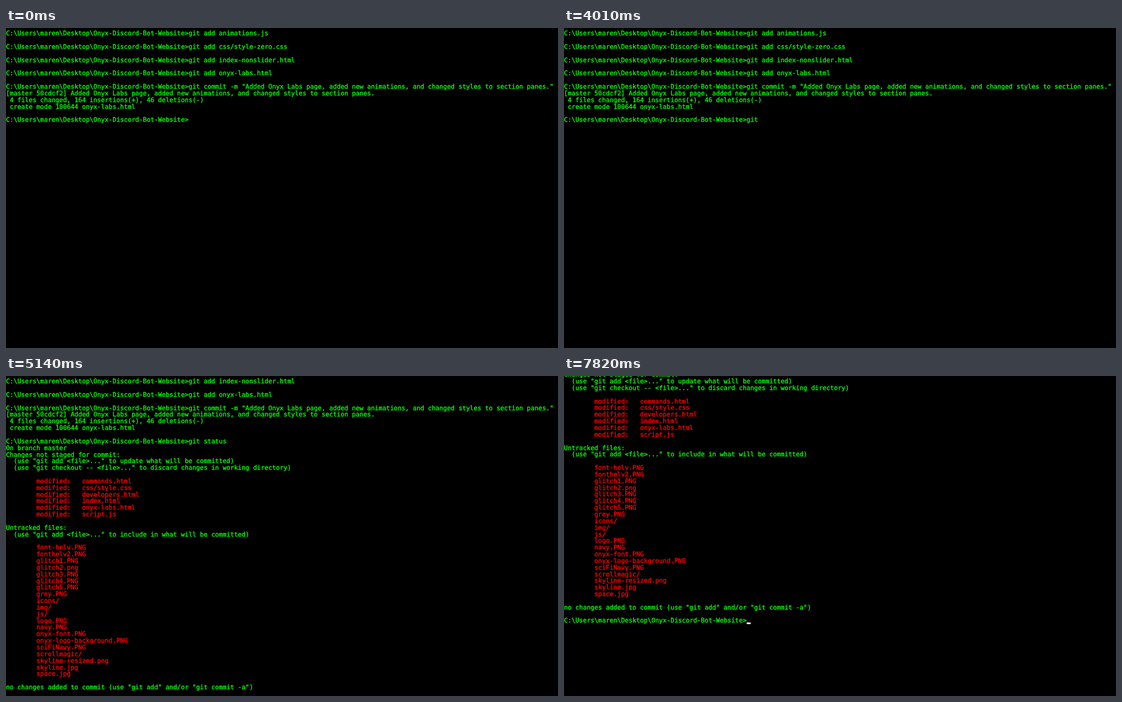
Write an HTML page that moves like this. It is 982 px wide and 570 px high and loops after 8 s.

```html
<!DOCTYPE html>
<html lang="en">
<head>
<meta charset="utf-8">
<title>Terminal</title>
<style>
  html, body { margin: 0; width: 100%; height: 100%; overflow: hidden; background: #000; }
  #screen { position: absolute; left: 0; top: 0; width: 982px; height: 570px; overflow: hidden; }
  #text {
    position: absolute; left: 0; margin: 0; color: #0f0; white-space: pre;
    font: 11.247px/11.857px "DejaVu Sans Mono", monospace;
    -webkit-text-stroke: 0.4px currentColor;
    text-rendering: geometricPrecision; font-variant-ligatures: none;
  }
  #text div { height: 11.857px; }
  #text .red { color: #f00; }
  #cursor { position: absolute; width: 7px; height: 3px; background: #fff; }
</style>
</head>
<body>
<div id="screen"><div id="text"></div><div id="cursor"></div></div>
<script>
const LOOP = 8000, ROW = 11.857, COL = 6.771, TOP = 4.3;
const PROMPT = 'C:\\Users\\maren\\Desktop\\Onyx-Discord-Bot-Website>';
const COMMAND = 'git status', COMMAND_ROW = 13, LAST_ROW = 52;
const MESSAGE = 'Added Onyx Labs page, added new animations, and changed styles to section panes.';
const indent = ' '.repeat(8);

const added = ['animations.js', 'css/style-zero.css', 'index-nonslider.html', 'onyx-labs.html'];
const modified = 'commands.html css/style.css developers.html index.html onyx-labs.html script.js'.split(' ');
const untracked = ('font-helv.PNG fonthelv2.PNG glitch1.PNG glitch2.png glitch3.PNG glitch4.PNG glitch5.PNG ' +
  'grey.PNG icons/ img/ js/ logo.PNG navy.PNG onyx-font.PNG onyx-logo-background.PNG sciFiNavy.PNG ' +
  'scrollmagic/ skyline-resized.png skyline.jpg space.jpg').split(' ');

const lines = [
  ...added.flatMap(file => [PROMPT + 'git add ' + file, '']),
  `${PROMPT}git commit -m "${MESSAGE}"`,
  '[master 50cdcf2] ' + MESSAGE,
  ' 4 files changed, 164 insertions(+), 46 deletions(-)',
  ' create mode 100644 onyx-labs.html',
  '',
  PROMPT,
  'On branch master',
  'Changes not staged for commit:',
  '  (use "git add <file>..." to update what will be committed)',
  '  (use "git checkout -- <file>..." to discard changes in working directory)',
  '',
  ...modified.map(file => indent + 'modified:   ' + file),
  '',
  'Untracked files:',
  '  (use "git add <file>..." to include in what will be committed)',
  '',
  ...untracked.map(file => indent + file),
  '',
  'no changes added to commit (use "git add" and/or "git commit -a")',
  '',
  PROMPT
];

// Each track is a list of [start time, value].
const keyTimes = [3500, 3575, 3650, 3790, 4180, 4254, 4328, 4402, 4476, 4550];
const scrollTrack = [[0, 0], [5050, 3], [5140, 4], [7620, 7], [7690, 10], [7755, 13], [7820, 16]];
const countTrack = [[0, 14], [4990, 18], [5050, 24], [5140, lines.length]];
const rowTrack = [[0, COMMAND_ROW], [4850, COMMAND_ROW + 1], [5140, LAST_ROW]];
const cursorTrack = [[0, 0], [1390, 1], [1870, 0], [2420, 1], [2940, 0], [3500, 1],
  [4010, 0], [4180, 1], [4990, 0], [5140, 1]];
const valueAt = (track, t) => track.filter(([start]) => start <= t).pop()[1];

const text = document.getElementById('text');
const cursor = document.getElementById('cursor');
const rows = lines.map(line => {
  const row = document.createElement('div');
  row.textContent = line;
  if (line.startsWith(indent)) row.className = 'red';
  return text.appendChild(row);
});

function draw(t) {
  const typed = keyTimes.filter(k => k <= t).length;
  const scroll = valueAt(scrollTrack, t);
  const count = valueAt(countTrack, t);
  const row = valueAt(rowTrack, t);
  const col = row === COMMAND_ROW + 1 ? 0 : PROMPT.length + (row === COMMAND_ROW ? typed : 0);

  rows.forEach((el, i) => { el.style.visibility = i < count ? 'visible' : 'hidden'; });
  rows[COMMAND_ROW].textContent = PROMPT + COMMAND.slice(0, typed);
  text.style.top = TOP - scroll * ROW + 'px';

  cursor.style.visibility = valueAt(cursorTrack, t) ? 'visible' : 'hidden';
  cursor.style.left = Math.round(col * COL) + 'px';
  cursor.style.top = Math.round(TOP + (row - scroll) * ROW + 8) + 'px';
}

const begin = performance.now();
function tick() {
  draw((performance.now() - begin) % LOOP);
  requestAnimationFrame(tick);
}
tick();
</script>
</body>
</html>
```
